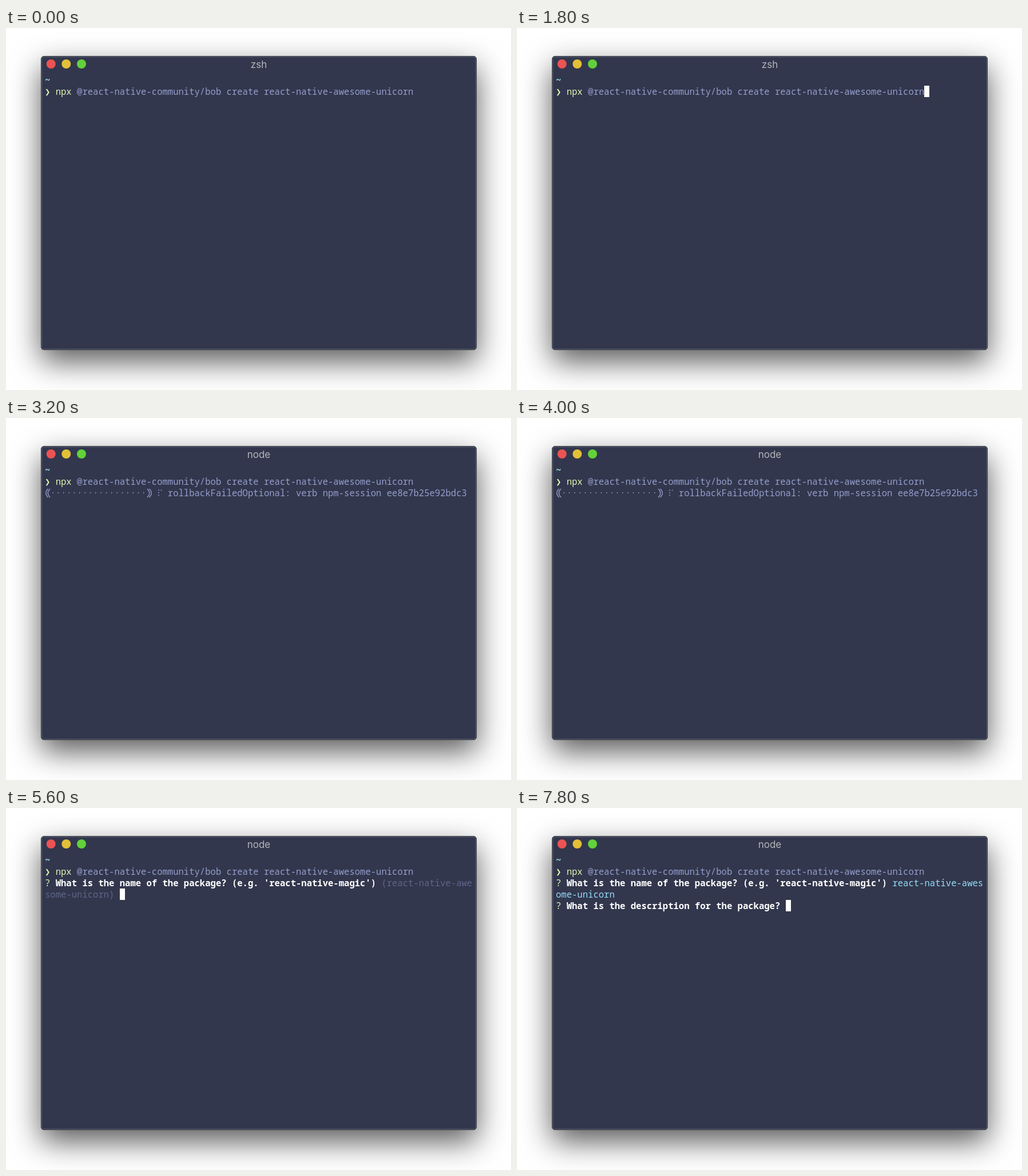
These frames come from a looping animation (883x634 px, 8 s). An HTML page with a canvas:

```html
<!DOCTYPE html>
<html lang="en">
<head>
<meta charset="utf-8">
<title>Terminal</title>
<style>
  html, body { margin: 0; width: 883px; height: 634px; overflow: hidden; background: #fff; }
  canvas { display: block; }
</style>
</head>
<body>
<canvas id="stage" width="883" height="634"></canvas>
<script>
const ctx = document.getElementById('stage').getContext('2d');
const LOOP = 8000, BLINK = 600;
const LEFT = 68, TOP = 81, COL = 9.34, ROW = 20;
const MONO = '15.57px "Noto Sans Mono", "DejaVu Sans Mono", monospace';
const LAVENDER = '#959dcb', GREEN = '#e0f7b0', CYAN = '#96dcf8', AQUA = '#a3f7ff', GREY = '#5f6688', WHITE = '#fff';

// Every character sits on the terminal grid.
function print(row, col, text, color, weight = 500) {
  ctx.font = `${weight} ${MONO}`;
  ctx.fillStyle = color;
  [...text].forEach((char, i) => ctx.fillText(char, LEFT + (col + i) * COL, TOP + row * ROW + 15.5));
}

function disc(x, y, radius, color) {
  ctx.fillStyle = color;
  ctx.beginPath();
  ctx.arc(x, y, radius, 0, 7);
  ctx.fill();
}

function doubleParen(x, direction) {
  ctx.strokeStyle = LAVENDER;
  ctx.lineWidth = 1.3;
  for (const offset of [0, 3.5]) {
    ctx.beginPath();
    ctx.moveTo(x + direction * (offset + 4.5), 124);
    ctx.quadraticCurveTo(x + direction * (offset - 3), 131.5, x + direction * (offset + 4.5), 139);
    ctx.stroke();
  }
}

function progress() {
  doubleParen(69, 1);
  doubleParen(255, -1);
  for (let col = 1; col <= 18; col++) disc(LEFT + (col + 0.5) * COL, 131, 0.9, LAVENDER);
  for (const [x, y] of [[267, 126.5], [271.5, 126.5], [267, 131], [267, 135.5]]) disc(x, y, 1, LAVENDER);
  print(2, 23, 'rollbackFailedOptional: verb npm-session ee8e7b25e92bdc3', LAVENDER);
}

function question(row, text) {
  print(row, 0, '?', GREEN);
  print(row, 2, text, WHITE, 700);
}

const askName = () => question(2, "What is the name of the package? (e.g. 'react-native-magic')");

function suggestName() {
  askName();
  print(2, 63, '(react-native-awe', GREY);
  print(3, 0, 'some-unicorn)', GREY);
}

function askDescription() {
  askName();
  print(2, 63, 'react-native-awes', CYAN);
  print(3, 0, 'ome-unicorn', CYAN);
  question(4, 'What is the description for the package?');
}

// The cursor blink restarts with each scene.
const scenes = [
  { start: -600, cursor: [1, 69] },
  { start: 2400, cursor: [2, 0] },
  { start: 3200, draw: progress },
  { start: 4800, cursor: [2, 0] },
  { start: 5600, draw: suggestName, cursor: [3, 14] },
  { start: 6600, draw: askDescription, cursor: [4, 43] },
];

function drawWindow(title) {
  ctx.fillStyle = '#fff';
  ctx.fillRect(0, 0, 883, 634);
  ctx.save();
  ctx.shadowColor = 'rgba(0, 0, 0, .65)';
  ctx.shadowBlur = 52;
  ctx.shadowOffsetY = 20;
  ctx.fillStyle = '#32374d';
  ctx.beginPath();
  ctx.roundRect(61, 49, 762, 515, 6);
  ctx.fill();
  ctx.restore();
  ctx.lineWidth = 1;
  for (const [inset, color] of [[0.5, '#2b2e3b'], [1.5, '#626675']]) {
    ctx.strokeStyle = color;
    ctx.beginPath();
    ctx.roundRect(61 + inset, 49 + inset, 762 - 2 * inset, 515 - 2 * inset, 6 - inset);
    ctx.stroke();
  }
  disc(78.7, 63, 8, '#ec5353');
  disc(105.3, 63, 8, '#e2c038');
  disc(132, 63, 8, '#62d13a');
  ctx.font = '17px Inter, sans-serif';
  ctx.fillStyle = '#b4b5ba';
  ctx.textAlign = 'center';
  ctx.fillText(title, 442, 69.5);
  ctx.textAlign = 'left';
}

function render(now) {
  const time = now % LOOP;
  const { start, draw, cursor } = scenes.findLast(scene => time >= scene.start);
  drawWindow(time < 3000 ? 'zsh' : 'node');
  print(0, 0, '~', AQUA, 700);
  print(1, 0, '❯', GREEN, 700);
  print(1, 2, 'npx', GREEN);
  print(1, 6, '@react-native-community/bob create react-native-awesome-unicorn', LAVENDER);
  draw?.();
  if (cursor && Math.floor((time - start) / BLINK) % 2 === (start < 0 ? 1 : 0) ^ (start < 0)) {
    const [row, col] = cursor;
    ctx.fillStyle = WHITE;
    ctx.fillRect(Math.round(LEFT + col * COL), TOP + row * ROW, 9, ROW);
  }
  requestAnimationFrame(render);
}
requestAnimationFrame(render);
</script>
</body>
</html>
```
